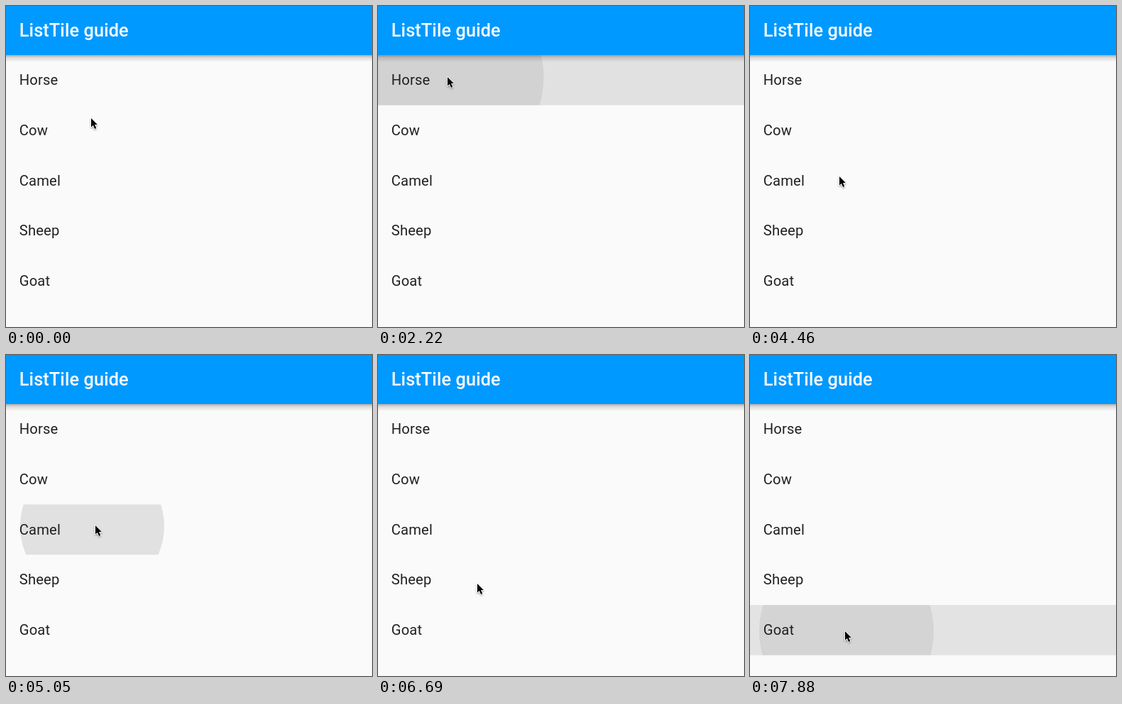
Animation of 516 by 452 pixels, one loop 8 s. Source, as an HTML page:

```html
<!DOCTYPE html>
<html lang="en">
<head>
<meta charset="utf-8">
<title>ListTile guide</title>
<style>
  html, body { margin: 0; width: 100%; height: 100%; overflow: hidden; background: #fafafa; }
  svg { display: block; width: 516px; height: 452px; }
  text { font-family: Roboto, Arial, sans-serif; white-space: pre; }
  .title { font-size: 25.3px; font-weight: 500; letter-spacing: .1px; fill: #fff; }
  .item { font-size: 20.2px; letter-spacing: .15px; fill: #212121; }
</style>
</head>
<body>
<svg viewBox="0 0 516 452" xmlns="http://www.w3.org/2000/svg">
  <defs>
    <linearGradient id="shade" x1="0" y1="0" x2="0" y2="1">
      <stop offset="0" stop-opacity=".32"/>
      <stop offset=".35" stop-opacity=".13"/>
      <stop offset="1" stop-opacity="0"/>
    </linearGradient>
    <filter id="soft" x="-50%" y="-50%" width="200%" height="200%">
      <feGaussianBlur stdDeviation=".8"/>
    </filter>
    <clipPath id="rowClip"><rect id="clipRect" width="516" height="70.75"/></clipPath>
    <path id="arrow" d="M0 0V12.6L2.9 9.9L5.1 14.9L7.3 13.9L5.1 9.1H8.9Z"/>
  </defs>
  <rect width="516" height="452" fill="#fafafa"/>
  <rect id="glow" width="516" height="70.75" fill="#bcbcbc"/>
  <g clip-path="url(#rowClip)"><circle id="splash" fill="#bcbcbc" fill-opacity=".4"/></g>
  <g id="list"></g>
  <rect y="69" width="516" height="10" fill="url(#shade)"/>
  <rect width="516" height="69" fill="#0099ff"/>
  <text class="title" x="18.8" y="43.2">ListTile guide</text>
  <g id="cursor" stroke-linejoin="round">
    <use href="#arrow" y="1.2" stroke="#000" stroke-width="1.6" opacity=".4" filter="url(#soft)"/>
    <use href="#arrow" fill="#fff" stroke="#fff" stroke-width="1.9"/>
    <use href="#arrow"/>
  </g>
</svg>
<script>
const LOOP = 8000, TOP = 69, ROW = 70.75;
const $ = id => document.getElementById(id);
const set = (el, attrs) => { for (const k in attrs) el.setAttribute(k, attrs[k]); };

["Horse", "Cow", "Camel", "Sheep", "Goat"].forEach((name, i) => {
  const label = document.createElementNS("http://www.w3.org/2000/svg", "text");
  set(label, { class: "item", x: 18.8, y: 111.2 + i * ROW });
  label.textContent = name;
  $("list").append(label);
});

// Pointer paths: the first point is the resting place, each later one a step.
const moves = [
  { from: 140, to: 580, path: [[120, 158], [116, 146], [107, 123], [100, 105], [98, 100]] },
  { from: 3720, to: 4460, path: [[98, 100], [100, 112], [106, 142], [114, 180], [121, 213], [125, 234], [126, 240]] },
  { from: 6390, to: 7280, path: [[126, 240], [128, 259], [134, 292], [140, 322], [146, 347], [146, 368], [140, 383], [134, 389]] }
];

const taps = [
  { row: 0, x: 98.5, y: 100, from: 1920, to: 2220, r: [7, 135], glow: [.03, .28, .4], up: 3270, gone: 3420 },
  { row: 2, x: 121.5, y: 241, from: 4760, to: 5050, r: [6, 101.5], glow: [0, 0, 0], up: 5950, gone: 6090 },
  { row: 4, x: 136, y: 389, from: 7580, to: 7880, r: [6, 123], glow: [.03, .28, .37], up: LOOP, gone: LOOP }
];

// Index of the current step among `count` evenly spaced ones; -1 before the first.
function stepAt(t, from, to, count) {
  const gap = (to - from) / (count - 1);
  return Math.max(-1, Math.min(count - 1, Math.floor((t - from) / gap + .03)));
}

function drawPointer(t) {
  let point = moves[0].path[0];
  for (const { from, to, path } of moves) {
    if (t >= from) point = path[stepAt(t, from, to, path.length - 1) + 1];
  }
  set($("cursor"), { transform: `translate(${point})` });
}

function drawTap(t) {
  const tap = taps.find(p => t >= p.from && t < p.gone);
  let glow = 0, radius = 0;
  if (tap) {
    const y = TOP + tap.row * ROW;
    if (t >= tap.up) {
      glow = .34;
    } else {
      const step = stepAt(t, tap.from, tap.to, 3);
      glow = tap.glow[step];
      radius = tap.r[0] + (tap.r[1] - tap.r[0]) * step / 2;
    }
    set($("glow"), { y });
    set($("clipRect"), { y });
    set($("splash"), { cx: tap.x, cy: tap.y });
  }
  set($("glow"), { "fill-opacity": glow });
  set($("splash"), { r: radius });
}

const start = performance.now();
function draw(now) {
  const t = Math.max(0, now - start) % LOOP;
  drawPointer(t);
  drawTap(t);
  requestAnimationFrame(draw);
}
draw(start);
</script>
</body>
</html>
```
